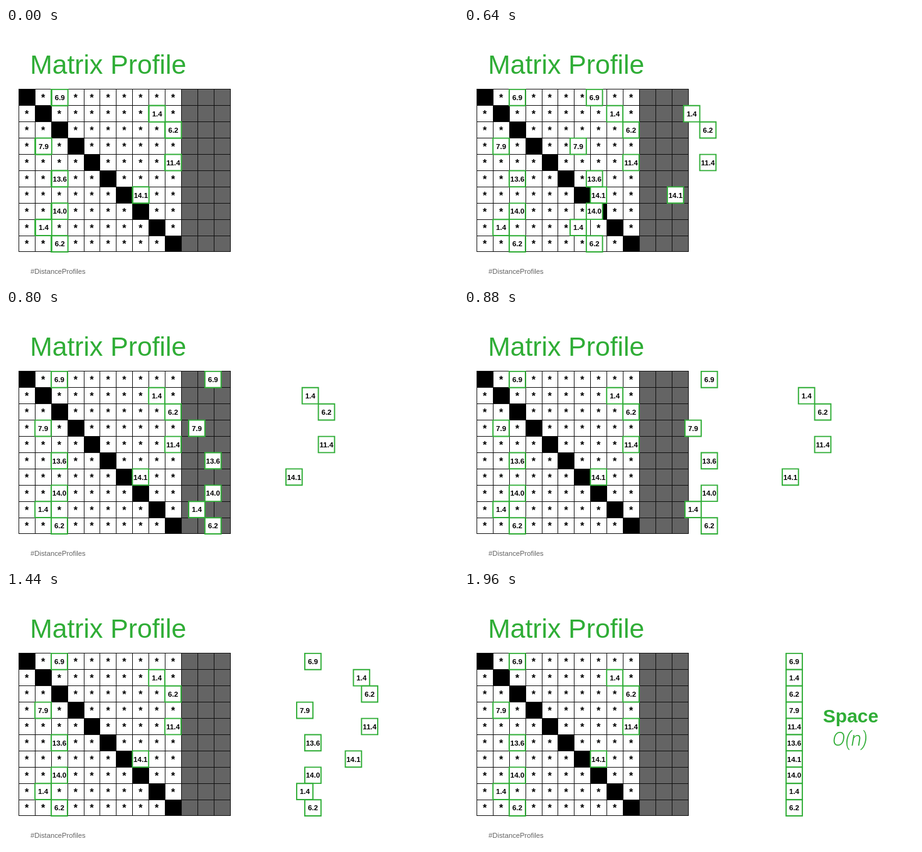
Animation of 720x405 px, one loop 2.44 s. Source, as an HTML page with a canvas:

```html
<!DOCTYPE html>
<html lang="en">
<meta charset="utf-8">
<title>Matrix Profile</title>
<style>
  html, body { margin: 0; height: 100%; overflow: hidden; background: #fff; }
  canvas { display: block; }
</style>
<canvas id="stage" width="720" height="405"></canvas>
<script>
const ctx = document.getElementById('stage').getContext('2d');
const LOOP = 2440, STEP = 40, PITCH = 25.9;
const GREEN = '#2fad36', GREY = '#646464';
const SANS = '"Liberation Sans", Arial, sans-serif';
const cols = [2, 8, 9, 1, 9, 2, 7, 2, 1, 2];
const values = ['6.9', '1.4', '6.2', '7.9', '11.4', '13.6', '14.1', '14.0', '1.4', '6.2'];

const lineX = i => Math.floor(20.4 + PITCH * i);
const lineY = j => Math.floor(97.9 + PITCH * j);
const midX = c => 33.2 + 25.87 * c;
const midY = r => 110.8 + 25.92 * r;

// Number of steps taken since start, limited to count
const steps = (t, start, count) =>
  Math.max(0, Math.min(count, Math.floor((t - start) / STEP) + 1));

function text(str, x, y, font, color, align = 'center') {
  ctx.font = font;
  ctx.fillStyle = color;
  ctx.textAlign = align;
  ctx.fillText(str, x, y);
}

function box(value, x, y) {
  ctx.fillStyle = '#fff';
  ctx.strokeStyle = GREEN;
  ctx.lineWidth = 1.9;
  ctx.beginPath();
  ctx.rect(x - 12.9, y - 12.9, 25.8, 25.8);
  ctx.fill();
  ctx.stroke();
  text(value, x, y + 4.2, `bold 11.5px ${SANS}`, '#000');
}

function drawMatrix() {
  const left = lineX(0), right = lineX(13), top = lineY(0), bottom = lineY(10);
  ctx.fillStyle = GREY;
  ctx.fillRect(lineX(10), top, right - lineX(10), bottom - top);
  for (let r = 0; r < 10; r++) {
    for (let c = 0; c < 10; c++) {
      if (r === c) {
        ctx.fillStyle = '#000';
        ctx.fillRect(lineX(c), lineY(r), 26, 26);
      } else if (c !== cols[r]) {
        text('*', midX(c), midY(r) + 6.4, `bold 16px ${SANS}`, '#000');
      }
    }
  }
  ctx.fillStyle = '#111';
  for (let i = 0; i <= 13; i++) ctx.fillRect(lineX(i), top, 1, bottom - top + 1);
  for (let j = 0; j <= 10; j++) ctx.fillRect(left, lineY(j), right - left + 1, 1);
  values.forEach((v, r) => box(v, midX(cols[r]), midY(r)));
}

function draw(now) {
  const t = now % LOOP;
  ctx.fillStyle = '#fff';
  ctx.fillRect(0, 0, 720, 405);
  text('Matrix Profile', 38.2, 73, `42.7px ${SANS}`, GREEN, 'left');
  text('#DistanceProfiles', 39, 392, `11.25px ${SANS}`, GREY, 'left');
  drawMatrix();

  // Copies slide out to the right, then gather in one column
  const shift = 30.5 * steps(t, 520, 12);
  const gather = steps(t, 1440, 2) / 2;
  values.forEach((v, r) => {
    const x = 34.1 + 25.82 * cols[r] + shift;
    box(v, x + (526 - x) * gather, midY(r));
  });

  if (t >= 1960) {
    text('Space', 616, 208, `bold 30px ${SANS}`, GREEN);
    text('O(n)', 615, 244.5, 'italic 300 31px Roboto, sans-serif', GREEN);
  }
  requestAnimationFrame(draw);
}
requestAnimationFrame(draw);
</script>
</html>
```
